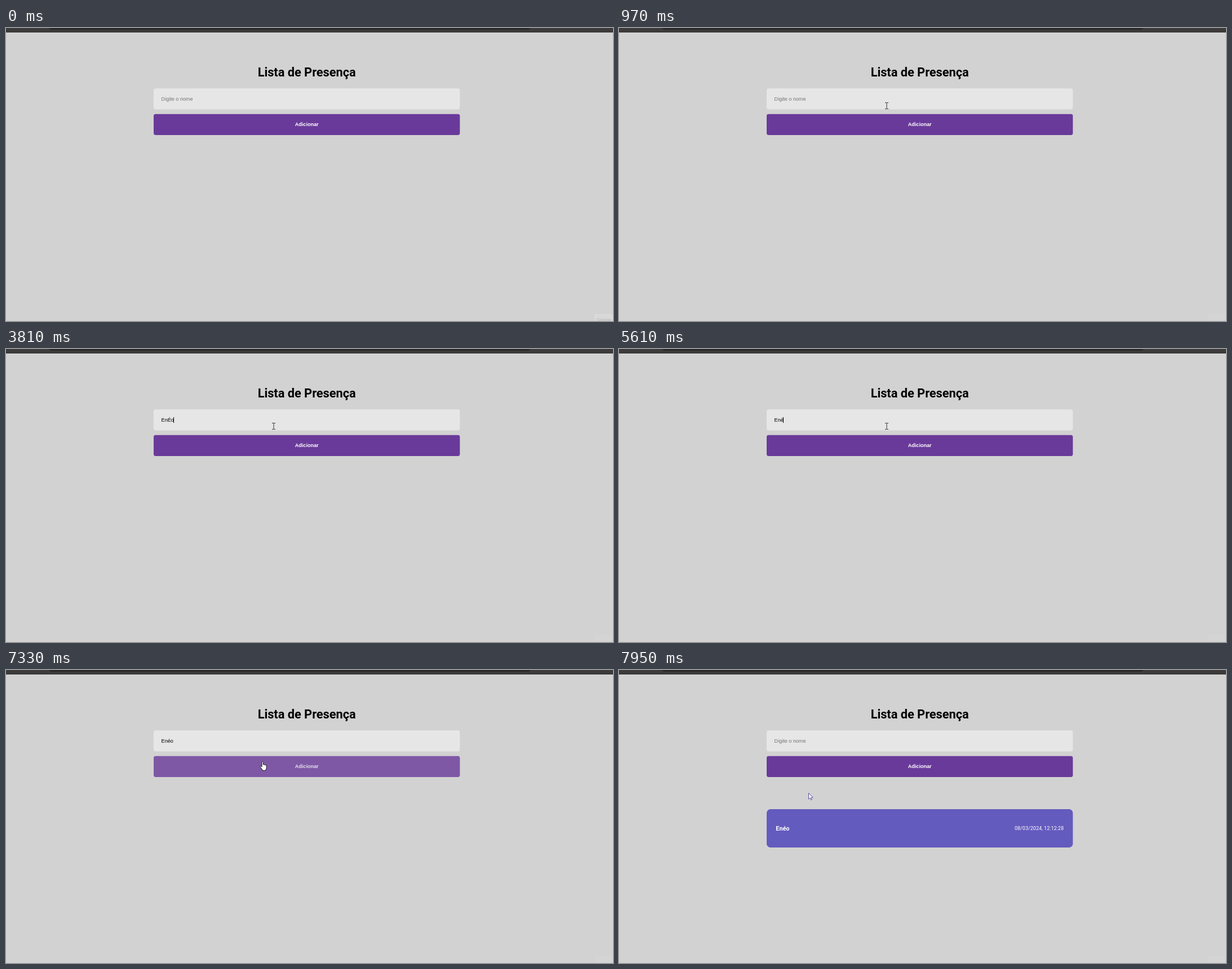
These frames come from a looping animation (1077x520 px, 8000 ms). An HTML page with a canvas:

```html
<!DOCTYPE html>
<html lang="pt-BR">
<head>
<meta charset="utf-8">
<title>Lista de Presença</title>
<style>
  html, body { margin: 0; width: 100%; height: 100%; overflow: hidden; background: #d2d2d2; }
  canvas { display: block; }
</style>
</head>
<body>
<canvas id="stage" width="1077" height="520"></canvas>
<script>
const ctx = document.getElementById('stage').getContext('2d');
const LOOP = 8000;
const LEFT = 262, WIDTH = 543.3, RIGHT = LEFT + WIDTH, MIDDLE = LEFT + WIDTH / 2;
const SANS = '"Liberation Sans", Arial, sans-serif';
const ROBOTO = 'Roboto, sans-serif';
const FIELD_FONT = '9.05px ' + SANS;
const CARD_TIME = 7400;

// [time, typed text, caret visible]
const typing = [
  [0, '', 0], [1240, '', 1], [1770, '', 0],
  [2160, 'E', 1], [2560, 'En', 1], [3090, 'En', 0],
  [3550, 'EnÉ', 1], [3810, 'EnÉo', 1], [4340, 'EnÉo', 0],
  [4400, 'EnÉ', 1], [4600, 'En', 1], [4870, 'En', 0], [5350, 'En', 1],
  [5610, 'Ené', 1], [5810, 'Enéo', 1], [6330, 'Enéo', 0], [6790, 'Enéo', 1],
  [7270, 'Enéo', 0], [CARD_TIME, '', 0]
];

// [time, pointer shape, x, y]
const pointer = [
  [0, null, 0, 0], [70, arrow, 1062, 508], [140, arrow, 1008, 470],
  [210, arrow, 880, 338], [280, arrow, 780, 272], [350, arrow, 712, 254],
  [420, arrow, 600, 205], [490, arrow, 475, 146], [560, beam, 466, 137],
  [630, arrow, 450, 150], [700, hand, 445, 160], [770, hand, 446, 160],
  [900, beam, 470, 138], [970, beam, 475, 138], [1240, beam, 478, 138],
  [1370, beam, 475, 137], [6860, beam, 470, 140], [6930, beam, 464, 143],
  [7000, arrow, 458, 149], [7060, hand, 455, 154], [7130, hand, 455, 158],
  [7270, hand, 455, 162], [7660, hand, 448, 176], [7730, arrow, 425, 240],
  [7800, arrow, 385, 309], [7870, arrow, 352, 270], [7950, arrow, 336, 218]
];

// [enter, leave] spans of the button's hover fade
const hovers = [[700, 845], [7060, 7690]];
const FADE = 120;

const latest = (keys, t) => keys.filter(k => k[0] <= t).pop();
const clamp = v => Math.max(0, Math.min(1, v));

function hoverAmount(t) {
  return Math.max(...hovers.map(([enter, leave]) =>
    Math.min(clamp((t - enter) / FADE), 1 - clamp((t - leave) / FADE))));
}

function box(x, y, w, h, radius, color) {
  ctx.fillStyle = color;
  ctx.beginPath();
  ctx.roundRect(x, y, w, h, radius);
  ctx.fill();
}

function label(text, x, y, font, color, align = 'left') {
  ctx.font = font;
  ctx.fillStyle = color;
  ctx.textAlign = align;
  ctx.fillText(text, x, y);
}

function outlined(path, x, y, ink) {
  ctx.save();
  ctx.translate(x, y);
  const shape = new Path2D(path);
  ctx.lineJoin = 'round';
  ctx.lineWidth = 1;
  ctx.fillStyle = '#fff';
  ctx.strokeStyle = ink;
  ctx.fill(shape);
  ctx.stroke(shape);
  ctx.restore();
}

function arrow(x, y, t) {
  outlined('M.5.5V11.2L3 8.9 4.7 12.7 6.4 12 4.8 8.3H8.2Z', x, y, t > CARD_TIME ? '#5b4e9c' : '#222');
}

function hand(x, y) {
  outlined('M-1 1.5Q-1 .3 .2 .3T1.4 1.5V6Q2.5 5 3.6 6.4 4.8 5.6 5.6 7 7 6.6 7.2 8V11.5' +
    'Q7 13.5 6 14.5V16.3H-.2V14.8L-3.6 10.4Q-4.5 9-3.4 8.5-2.4 8.2-1 10Z', x, y, '#1c1424');
}

function beam(x, y) {
  ctx.strokeStyle = '#333';
  ctx.lineWidth = 1;
  ctx.stroke(new Path2D(
    `M${x - 3} ${y - 5.5}h2.5l.5.5.5-.5h2.5M${x - 3} ${y + 5.5}h2.5l.5-.5.5.5h2.5M${x} ${y - 5}v10`));
}

function drawPage() {
  ctx.fillStyle = '#d2d2d2';
  ctx.fillRect(0, 0, 1077, 520);
  ctx.fillStyle = '#3c3b3a';
  ctx.fillRect(0, 0, 1077, 8);
  box(75, -12, 857, 15, 7, '#282828');
  label('Lista de Presença', MIDDLE, 86, 'bold 21.73px ' + ROBOTO, '#000', 'center');
}

function drawRecordTip(t) {
  if (t >= 70) {
    box(1044, 508, 32, 12, 0, '#d4d4d4');
    return;
  }
  box(1044, 508, 32, 14, 1, '#dcdcdc');
  box(1045, 509, 30, 13, 0, '#d8d8d8');
  label('Gravar', 1048, 521, '8.5px ' + SANS, '#b4b4b4');
}

function drawField(t) {
  const [, text, caret] = latest(typing, t);
  box(LEFT, 107.2, WIDTH, 37.3, 3.4, '#e6e6e6');
  label(text || 'Digite o nome', 275.6, 129, FIELD_FONT, text ? '#000' : '#757575');
  if (caret) {
    ctx.fillStyle = '#000';
    ctx.fillRect(Math.floor(275.6 + ctx.measureText(text).width) + (text ? 0 : 1), 121, 1, 10);
  }
}

function drawButton(t) {
  ctx.globalAlpha = 1 - 0.2 * hoverAmount(t);
  box(LEFT, 152.7, WIDTH, 37.3, 3.4, '#6a3a9a');
  label('Adicionar', MIDDLE, 174, 'bold ' + FIELD_FONT, '#fff', 'center');
  ctx.globalAlpha = 1;
}

function drawCard() {
  box(LEFT, 247, WIDTH, 68, 6.8, '#645bbe');
  label('Enéo', 278.3, 285, 'bold 10.87px ' + ROBOTO, '#fff');
  label('08/03/2024, 12:12:28', RIGHT - 16.3, 284, '9.05px ' + ROBOTO, '#fff', 'right');
}

function draw(t) {
  drawPage();
  drawRecordTip(t);
  drawField(t);
  drawButton(t);
  if (t >= CARD_TIME) drawCard();
  const [, shape, x, y] = latest(pointer, t);
  if (shape) shape(x, y, t);
}

const start = performance.now();
function tick() {
  draw((performance.now() - start) % LOOP);
  requestAnimationFrame(tick);
}
tick();
</script>
</body>
</html>
```
